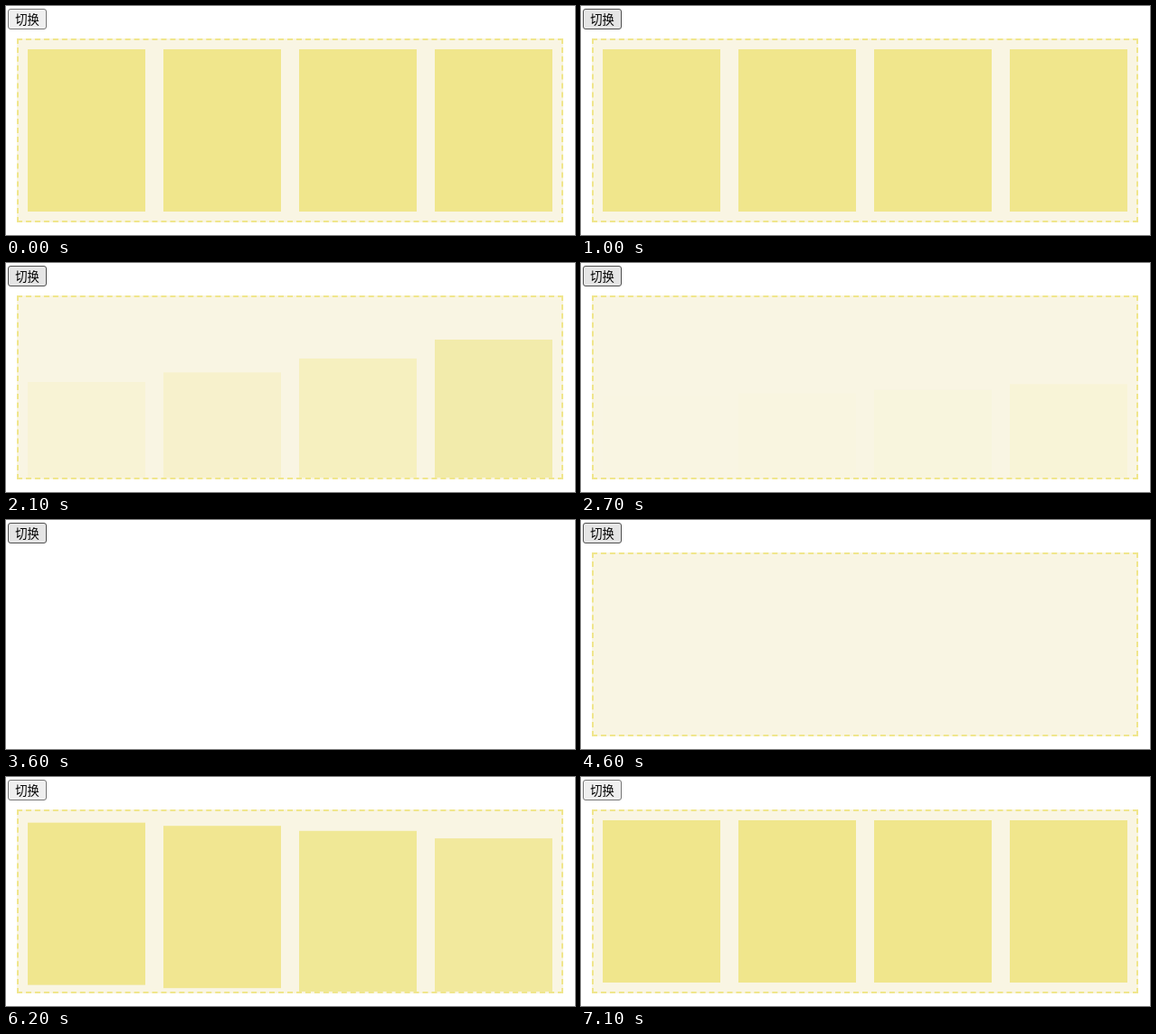
Animation of 629x254 px, one loop 7.9 s. Source, as an HTML page:

```html
<!DOCTYPE html>
<html lang="zh-CN">
<head>
<meta charset="utf-8">
<title>Staggered list transition</title>
<style>
  html, body {
    margin: 0;
    width: 100%;
    height: 100%;
    overflow: hidden;
    background: #fff;
  }
  .toggle, .list, .item {
    position: absolute;
    box-sizing: border-box;
  }
  .toggle {
    left: 2px;
    top: 3px;
    width: 43px;
    height: 23px;
    border: 1px solid #767676;
    border-radius: 3px;
    background: #efefef;
    color: #000;
    font: 13.333px/21px "Noto Sans CJK SC", "Noto Sans CJK", sans-serif;
    text-align: center;
    white-space: nowrap;
  }
  .toggle.hover { background: #e5e5e5; border-color: #4f4f4f; }
  .toggle.active { background: #f5f5f5; border-color: #8d8d8d; }
  .list {
    left: 12px;
    top: 36px;
    width: 604px;
    height: 204px;
    border: 2px dashed #f0e68c;
    background: #f9f5e3;
    overflow: hidden;
  }
  .item {
    top: 10px;
    width: 130px;
    height: 180px;
    background: #f0e68c;
  }
</style>
</head>
<body>
<div class="toggle">切换</div>
<div class="list"></div>
<script>
const LOOP = 7900, TICK = 100, SHIFT = 100;
const LEAVE = { start: 1137, step: 183, time: 1780, hold: 2700, end: 3600 };
const ENTER = { show: 4600, first: 5100, start: 4740, step: 182, time: 1840, end: 7100 };
const BUTTON = [[0, ""], [700, "hover"], [800, "active"], [1000, "hover"],
  [4500, "active"], [4600, "hover"], [5700, ""]];

const button = document.querySelector(".toggle");
const list = document.querySelector(".list");
const items = Array.from({ length: 4 }, (_, i) => {
  const item = document.createElement("div");
  item.className = "item";
  item.style.left = 10 + i * 150 + "px";
  list.append(item);
  return item;
});

// cubic-bezier(.25, .1, .25, 1)
function ease(x) {
  if (x <= 0) return 0;
  if (x >= 1) return 1;
  let lo = 0, hi = 1;
  for (let i = 0; i < 24; i++) {
    const s = (lo + hi) / 2;
    if (0.75 * s * (1 - s) + s ** 3 < x) lo = s;
    else hi = s;
  }
  return 0.3 * lo * (1 - lo) ** 2 + 3 * lo * lo * (1 - lo) + lo ** 3;
}

const progress = (t, move, i) => ease((t - move.start - i * move.step) / move.time);

function presence(t, i) {
  if (t < LEAVE.end) return 1 - progress(Math.min(t, LEAVE.hold), LEAVE, i);
  if (t < ENTER.first) return 0;
  return t >= ENTER.end ? 1 : progress(t, ENTER, i);
}

function draw(t) {
  const state = BUTTON.filter(([at]) => at <= t).pop()[1];
  button.className = "toggle " + state;
  list.style.display = t >= LEAVE.end && t < ENTER.show ? "none" : "block";
  items.forEach((item, i) => {
    const shown = presence(t, i);
    item.style.opacity = shown;
    item.style.transform = `translateY(${(1 - shown) * SHIFT}px)`;
  });
}

const begin = performance.now();
function loop() {
  const t = (performance.now() - begin) % LOOP;
  draw(Math.floor(t / TICK) * TICK);
  requestAnimationFrame(loop);
}
loop();
</script>
</body>
</html>
```
